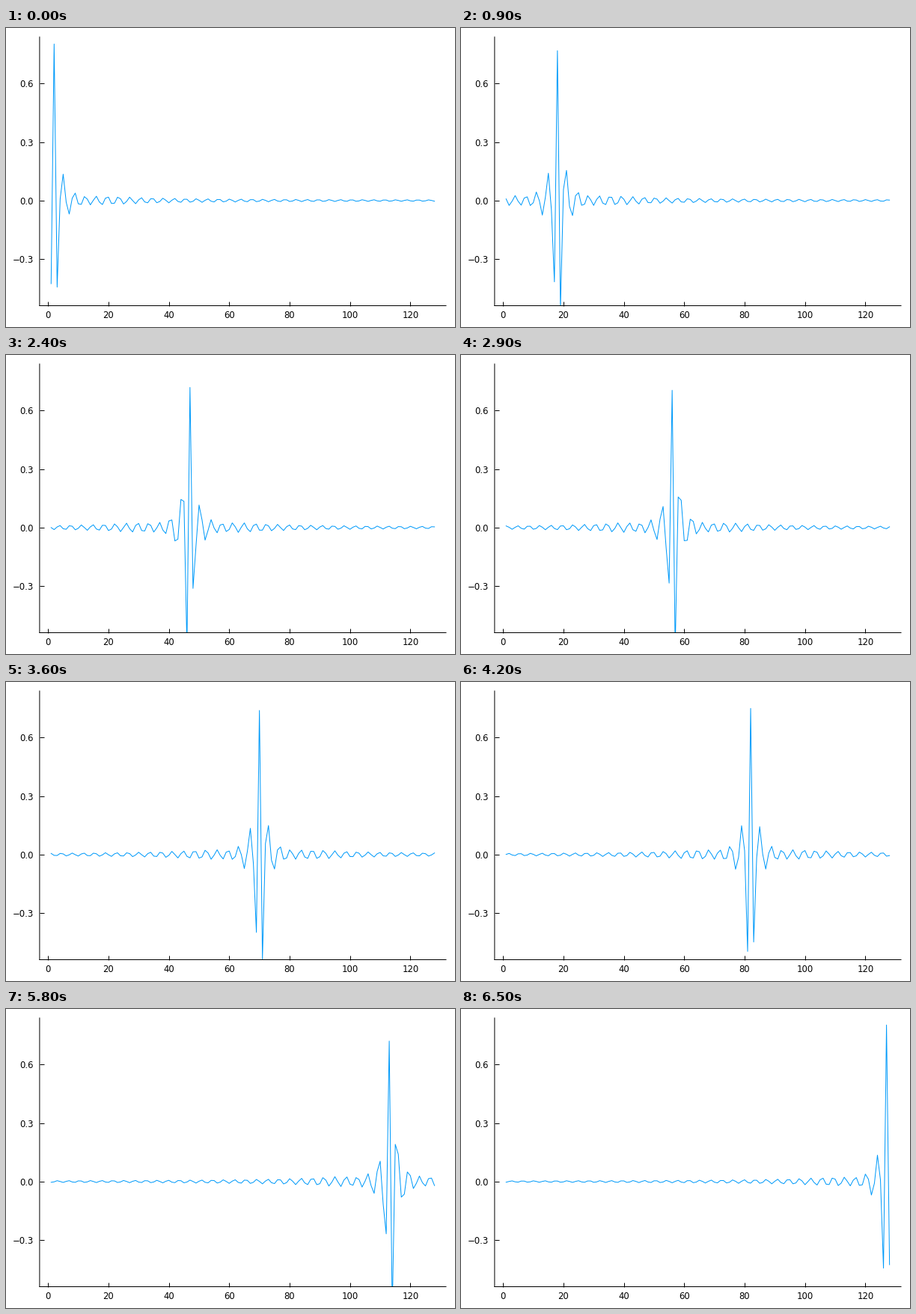
These frames come from a looping animation (600 by 400 pixels, 6.6 s). A matplotlib script:

```python
import numpy as np
import matplotlib.pyplot as plt
from matplotlib.animation import FuncAnimation

W, H, DPI = 600, 400, 100
FRAMES, STEP_MS = 66, 100
N = 128

plt.rcParams["font.family"] = "DejaVu Sans"
plt.rcParams["font.size"] = 8.4

n = np.arange(1, N + 1)

# Wave packet centre at a few moments
KNOT_T = [0, 9, 19, 29, 42, 51, 65]
KNOT_C = [2.02, 18.14, 36.99, 56.37, 81.95, 99.87, 126.98]


def kernel(d):
    """Half-band sinc whose tail drifts to a slightly lower frequency."""
    r = np.maximum(np.abs(d), 1e-9)
    drift = np.pi / 22 * r - 0.75 * (1 - np.exp(-(r / 20) ** 2))
    far = 1 - np.exp(-(r / 12.5) ** 2)
    half = np.pi * r / 2
    return (np.sin(half) * np.cos(drift) - far * np.cos(half) * np.sin(drift)) / half


def packet(k):
    c = np.interp(k, KNOT_T, KNOT_C)
    edge = min(c, N + 1 - c)
    amp = 0.735 + 0.07 * np.exp(-(edge - 1) / 30)
    y = amp * (-1.0) ** (n - round(c)) * kernel(n - c)
    # Side lobes are shallower next to a wall
    damp = 0.14 * np.exp(-((edge - 2) / 3) ** 2)
    return y * np.where(np.abs(n - c) > 0.5, 1 - damp, 1)


fig = plt.figure(figsize=(W / DPI, H / DPI), dpi=DPI, facecolor="white")
left, right, top, bottom = 44.9, 588, 12, 371.5
ax = fig.add_axes([left / W, 1 - bottom / H, (right - left) / W, (bottom - top) / H])
ax.set_xlim(-2.81, 131.81)
ax.set_ylim(-0.539, 0.8385)
ax.set_xticks(range(0, 121, 20))
ax.set_yticks([-0.3, 0, 0.3, 0.6], ["\u22120.3", "0.0", "0.3", "0.6"])
ax.spines[["top", "right"]].set_visible(False)
ax.spines[["left", "bottom"]].set_linewidth(0.72)
ax.tick_params(direction="in", length=4.2, width=0.72)
ax.tick_params(axis="x", pad=4.5)
ax.tick_params(axis="y", pad=5.6)
for part in [*ax.spines.values(), *ax.get_xticklines(), *ax.get_yticklines()]:
    part.set_snap(False)

line, = ax.plot(n, packet(0), color="#009AFA", lw=0.72)


def update(k):
    line.set_ydata(packet(k))
    return line,


anim = FuncAnimation(fig, update, frames=FRAMES, interval=STEP_MS, repeat=True, repeat_delay=0)
plt.show()
```
